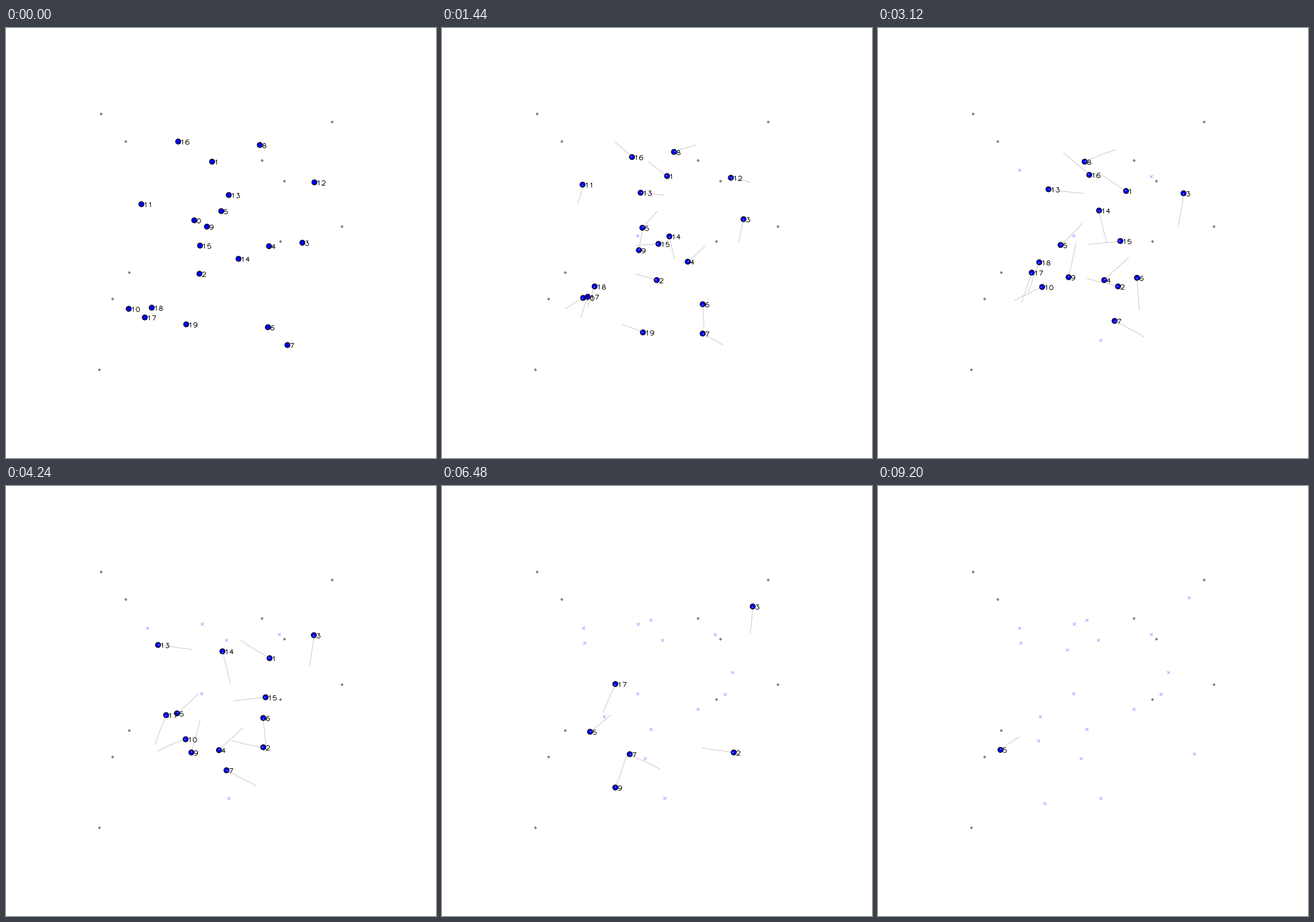
Write a matplotlib script that moves like this. It is 748 px wide and 748 px high and loops after 9.28 s.

```python
import numpy as np
import matplotlib.pyplot as plt
from matplotlib.animation import FuncAnimation
from matplotlib.collections import LineCollection, PolyCollection

SIZE, DPI = 748, 100
FRAMES, STEP_MS = 116, 80
TRAIL = 26                  # steps a trail reaches back
PX = 72 / DPI               # one pixel in points
LANDMARKS = [(165, 149), (567, 163), (208, 197), (445, 230), (484, 266),
             (584, 345), (477, 371), (214, 425), (185, 471), (162, 594)]


class Agent:
    """Walks from start to goal on a shallow arc; bow is its height in px."""

    def __init__(self, start, goal, bow, steps, ease=0):
        self.goal = goal
        self.gone = steps - 2            # counts as arrived just before the goal
        d = np.subtract(goal, start)
        normal = np.array([-d[1], d[0]]) / np.hypot(*d)
        u = np.arange(self.gone)[:, None] / steps
        t = u + ease * u * (1 - u)
        self.path = np.rint(start + d * t + normal * 4 * bow * t * (1 - t))


AGENTS = [
    Agent((327, 334), (340, 361), 0, 17),
    Agent((358, 232), (505, 324), 4.5, 76),
    Agent((336, 427), (550, 466), 7, 101),
    Agent((515, 373), (541, 194), 4, 90, ease=0.2),
    Agent((457, 379), (353, 474), 0, 63),
    Agent((374, 318), (208, 460), -8.5, 118, ease=0.2),
    Agent((455, 520), (445, 388), 1.5, 60),
    Agent((489, 551), (279, 443), 2, 104),
    Agent((441, 203), (341, 240), 2.5, 48),
    Agent((349, 345), (290, 552), -6.5, 94),
    Agent((213, 488), (363, 423), -6, 79),
    Agent((235, 306), (246, 247), 3, 31),
    Agent((536, 268), (475, 258), 2, 32),
    Agent((387, 290), (248, 273), -1.5, 60),
    Agent((404, 401), (363, 233), 0, 78),
    Agent((337, 378), (492, 362), 1, 72),
    Agent((299, 197), (383, 268), 0, 48),
    Agent((241, 503), (329, 285), -5, 112),
    Agent((253, 486), (282, 401), -1, 42),
    Agent((313, 515), (387, 543), 0, 37),
]


# ---- single-stroke digits in an 8 x 8 cell, y pointing down ----
def arc(cx, cy, rx, ry, a0, a1):
    a = np.radians(np.linspace(a0, a1, 17))
    return list(zip(cx + rx * np.cos(a), cy + ry * np.sin(a)))


SIX = arc(5, 4, 4, 4, -65, -180) + arc(4, 5.5, 3, 2.5, 180, 540)
DIGITS = [
    [arc(4, 4, 3, 4, 0, 360)],
    [[(2, 2), (4, 0), (4, 8)]],
    [arc(4, 2.5, 3, 2.5, 190, 385) + [(1, 8), (7, 8)]],
    [[(2, 0), (6, 0), (4, 3)] + arc(4, 5.5, 3, 2.5, -80, 155)],
    [[(5, 8), (5, 0), (1, 5), (7, 5)]],
    [[(6, 0), (2, 0), (1, 4)] + arc(4, 5.5, 3, 2.5, -130, 155)],
    [SIX],
    [[(1, 0), (7, 0), (3, 8)]],
    [arc(4, 2, 2, 2, 0, 360), arc(4, 6, 3, 2, 0, 360)],
    [[(8 - x, 8 - y) for x, y in SIX]],
]


def label(number, x, y):
    """Strokes of a number placed to the right of a dot."""
    return [np.array(stroke) + (x + 4 + 8 * i, y - 3)
            for i, c in enumerate(str(number)) for stroke in DIGITS[int(c)]]


def cross(x, y, r=2.5):
    return [[(x - r, y - r), (x + r, y + r)], [(x - r, y + r), (x + r, y - r)]]


def tail(path):
    """Short stroke inside the dot, pointing back along the trail."""
    d = path[max(0, len(path) - 6)] - path[-1]
    return [path[-1], path[-1] + 3 * d / max(np.hypot(*d), 1)]


def disc(x, y, r, corners):
    a = np.arange(corners) * 2 * np.pi / corners
    return np.column_stack([x + r * np.cos(a), y + r * np.sin(a)])


# ---- stage ----
fig = plt.figure(figsize=(SIZE / DPI, SIZE / DPI), dpi=DPI, facecolor="white")
ax = fig.add_axes([0, 0, 1, 1])
ax.set_xlim(-0.5, SIZE - 0.5)
ax.set_ylim(SIZE - 0.5, -0.5)
ax.axis("off")


def strokes(color, z):
    lines = LineCollection([], colors=[color], linewidths=PX, zorder=z)
    return ax.add_collection(lines, autolim=False)


ax.add_collection(PolyCollection([disc(x, y, 2.7, 4) for x, y in LANDMARKS],
                                 facecolors="#808080", linewidths=0),
                  autolim=False)
crosses = strokes("#9c9cff", 2)
trails = strokes("#c8c8c8", 3)
dots = ax.add_collection(
    PolyCollection([], facecolors="#0000ff", edgecolors="black",
                   linewidths=1.2 * PX, zorder=4), autolim=False)
tails = strokes("#b4b4ff", 5)
labels = strokes("black", 6)


def draw(n):
    live = [(i, a) for i, a in enumerate(AGENTS) if n < a.gone]
    paths = [a.path[max(0, n - TRAIL):n + 1] for _, a in live]
    crosses.set_segments([s for a in AGENTS if n >= a.gone
                          for s in cross(*a.goal)])
    trails.set_segments(paths if n else [])
    tails.set_segments([tail(p) for p in paths] if n else [])
    dots.set_verts([disc(*p[-1], 4.5, 24) for p in paths])
    labels.set_segments([s for i, a in live for s in label(i, *a.path[n])])
    return crosses, trails, dots, tails, labels


anim = FuncAnimation(fig, draw, frames=FRAMES, interval=STEP_MS,
                     repeat=True, repeat_delay=0, blit=False)
plt.show()
```
